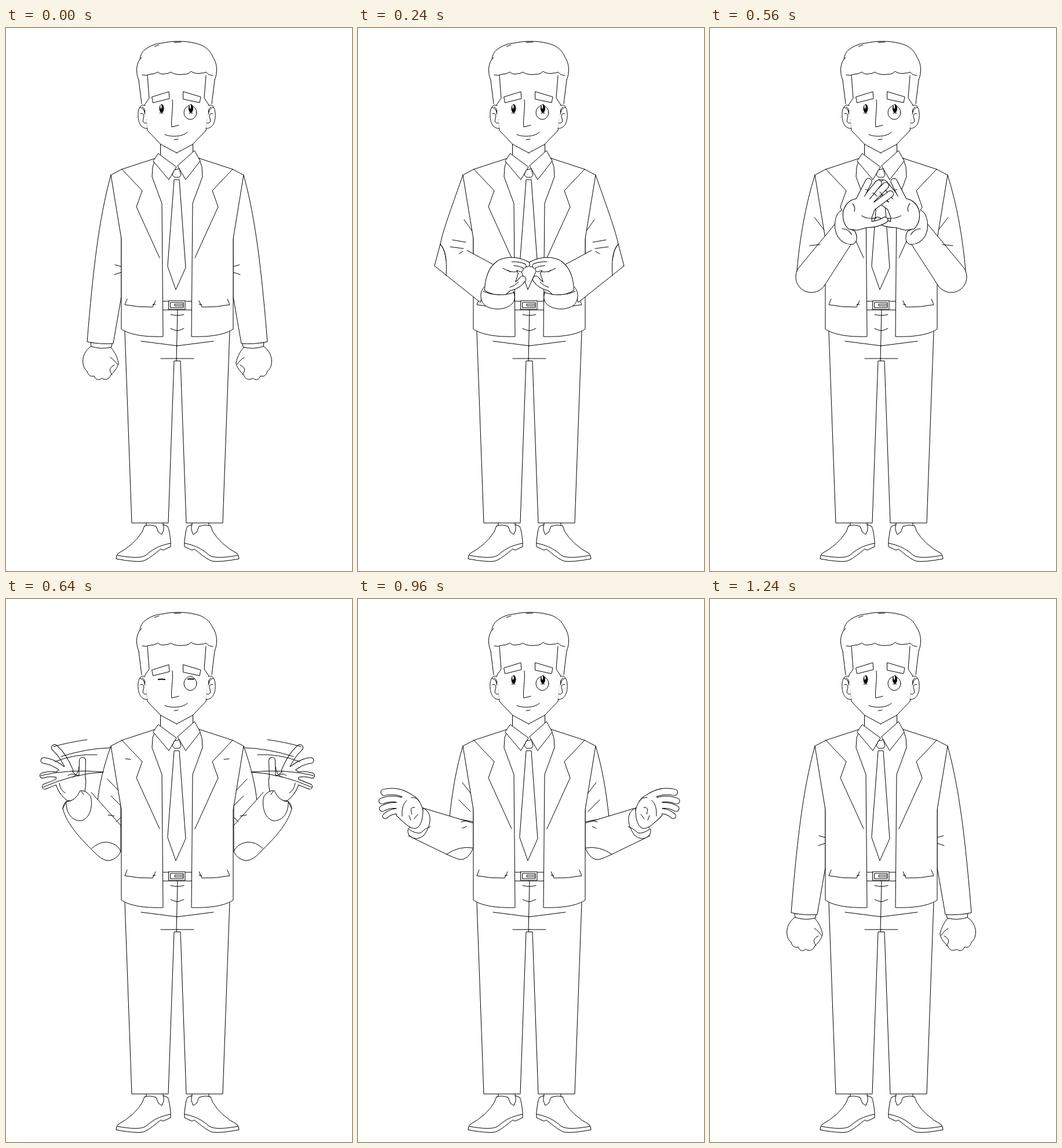
Write an HTML page that moves like this. It is 597 px wide and 938 px high and loops after 2.04 s.

```html
<!DOCTYPE html>
<html lang="en">
<head>
<meta charset="utf-8">
<title>Gesturing man</title>
<style>
  html, body { margin: 0; width: 100%; height: 100%; overflow: hidden; background: #fff; }
  svg { display: block; width: 100vw; height: 100vh; }
  path, ellipse { fill: none; stroke: #000; stroke-width: 1; stroke-linejoin: round; stroke-linecap: round; }
  .w { fill: #fff; }
  .b { fill: #000; }
  .blank { fill: #fff; stroke: none; }
</style>
</head>
<body>
<svg viewBox="0 0 597 938">
  <defs>
    <g id="leg">
      <path d="M205 524L217 855H280L290 575H295.5"/>
      <path d="M233 541L295.5 549M267 571H295.5M284 495Q290 496.500 295.500 496.500M284 519Q290 522 295.500 523"/>
    </g>
    <g id="shoe">
      <path d="M242 855V859M271 855V859"/>
      <path d="M239 860L235 870Q222 892 193 908Q190 911 190 917Q222 923 236 921Q244 919 262 904L267 900L271 902L284 896V887Q282 866 279 861L272 858"/>
      <path d="M192 911Q230 918 241 911C252 902 260 895 284 890"/>
      <path d="M239 860Q248 857 259 861L263 871L269 875L272 867V858"/>
    </g>
    <g id="coat">
      <path d="M258 225L200 244L181 254L199 364V520C212 529 235 534 271 533L269 303L252 257L253 240L258 225"/>
      <path d="M200 244L235 281L225 309L265 397"/>
      <path d="M209 468L205 478Q230 483 253 482L258 471M253 478L258 477"/>
      <path d="M271 472H281M271 487H295.500"/>
    </g>
    <g id="side">
      <path d="M229 90L234 131M244 82L247 121L239 133L244 177L267 201L295 216"/>
      <path class="w" d="M240 134C231 130 227 141 228 154C229 167 236 175 244 173"/>
      <path d="M231 137Q238 138 239 146M235 136Q242 141 239 149M232 148Q237 146 238 152L236 161Q239 166 243 164"/>
      <path d="M266.500 201V219"/>
    </g>
  </defs>

  <use href="#leg"/><use href="#leg" transform="matrix(-1 0 0 1 591 0)"/>
  <use href="#shoe"/><use href="#shoe" transform="matrix(-1 0 0 1 592 0)"/>
  <path d="M296 487L294 575"/>
  <g id="back"></g>
  <path class="blank" d="M258 225L181 254L199 364V520C212 529 235 534 271 533V487H320V533C356 534 379 529 392 520V364L410 254L334 225Z"/>
  <use href="#coat"/><use href="#coat" transform="matrix(-1 0 0 1 591 0)"/>
  <path d="M281 471H309V486H281ZM284 474H306V483H284ZM306 477H291V480H306"/>
  <path class="w" d="M290.500 262H299L310 414L293 452L279 412Z"/>

  <use href="#side"/><use href="#side" transform="matrix(-1 0 0 1 589 0)"/>
  <path class="w" d="M263 217L294 240L281 262L254 230Z"/>
  <path class="w" d="M325 212L296 238L310 262L335 230Z"/>
  <path class="w" d="M291 245L299 243L302 254L299 258H291L287 254Z"/>
  <path d="M229 90C224 78 224 64 231 54C232 46 236 40 239 38C249 30 261 26 270 26C285 22 310 22 325 26C342 29 352 38 357 50C364 60 366 76 360 90"/>
  <path d="M235 81Q242 83 248 80Q257 80 262 76Q267 81 275 79Q281 79 284 76Q293 82 307 80Q315 80 319 75Q327 80 337 78Q342 78 345 76Q350 82 357 82"/>
  <path d="M231 54L234 51M256 32L264 29M290 25L302 24"/>
  <path id="brows" d="M252 119L281 110L282 122L254 129ZM306 110L336 119L334 129L306 123Z"/>
  <path d="M287 124C289 140 284 158 286 171L298 168M274 184C285 189 305 188 313 180M290 193L297 192"/>
  <ellipse cx="318" cy="146" rx="11" ry="12"/>
  <g id="open">
    <ellipse class="b" cx="268.500" cy="139" rx="3.500" ry="7"/><ellipse class="b" cx="319" cy="139" rx="3.500" ry="7"/>
    <ellipse class="blank" cx="267.500" cy="136" rx="1.200" ry="3.500"/><ellipse class="blank" cx="318" cy="136" rx="1.200" ry="3.500"/>
    <path d="M265 147H271M316 147H322"/>
  </g>
  <path id="shut" style="stroke-width:2" d="M263 139Q269 138 274 139M314 138.500Q319 137.500 324 138.500"/>
  <g id="front"></g>
</svg>

<script>
const line = (...ds) => ds.map(d => `<path d="${d}"/>`).join('');
const fill = (...ds) => ds.map(d => `<path class="w" d="${d}"/>`).join('');
const tube = ([d, w]) =>
  `<path d="${d}" style="stroke-width:${w + 1}"/><path d="${d}" style="stroke:#fff;stroke-width:${w - 1}"/>`;

// Fingers sit between the outline of the palm and its fill, so their roots stay hidden.
const hand = (palm, fingers, ...creases) =>
  `<path class="w" style="stroke-width:2" d="${palm}"/>` + fingers.map(tube).join('') +
  `<path class="blank" d="${palm}"/>` + line(...creases);

const hands = {
  fist: { at: [164, 550], dir: 90, art:
    fill('M148 549C136 556 131 570 133 580Q134 588 140 593C142 600 146 603 152 601C154 607 160 610 165 605C172 609 178 607 181 599C190 591 194 583 194 578C192 568 186 557 181 552Z') +
    line('M180 569Q187 573 192 581M187 582Q177 587 180 594L183 599') +
    fill('M146 544L147 550Q165 556 182 551L183 545Z') },
  meet: { at: [240, 458], dir: -53, art:
    fill('M218 447C207 458 212 478 224 482C240 489 262 485 269 472Q272 464 268 455') +
    line('M216 455Q240 466 270 457') +
    hand('M219 453C220 425 230 408 246 400L262 399L276 424L268 448L255 460Q232 462 219 453Z',
      [['M250 403Q271 397 292 408', 9], ['M252 410Q272 405 286 411', 8], ['M254 417Q270 412 281 417', 8], ['M260 449Q277 445 284 434', 11]],
      'M250 415Q263 423 274 421M258 418L263 422M262 448Q270 446 277 439') },
  cross: { at: [281, 352], dir: -50, art:
    fill('M276 318C262 324 258 348 266 364Q276 380 292 378Q302 372 296 356L285 350') +
    line('M274 350Q286 352 290 362') +
    hand('M285 351C272 335 276 310 295 302L318 297L336 312L326 334L325 349L300 354Z',
      [['M318 324L361 296', 11], ['M314 316L354 281', 11], ['M310 310L342 276', 11], ['M300 314L325 272', 11], ['M305 344Q330 350 349 340', 10]],
      'M295 308Q300 315 297 322M309 330Q318 337 334 336M331 292L338 298M343 291L348 297M319 285L323 287') },
  swing: { at: [118, 342], dir: -120, art:
    hand('M106 348C96 340 90 332 86 318L88 298L104 288L120 304L137 310C138 325 135 340 128 347Z',
      [['M92 314Q80 319 67 324', 9], ['M92 305Q78 300 63 305', 9], ['M98 294Q80 280 65 279', 10], ['M110 296Q99 270 84 257', 11], ['M131 318L132 279', 11]],
      'M92 318Q94 331 102 335M126 290Q124 305 115 308M119 304Q112 300 107 305') },
  wide: { at: [118, 342], dir: -125, art:
    hand('M104 350C96 345 92 332 82 319L80 302L92 288L110 296L129 310C131 322 128 332 126 336Q116 352 104 350Z',
      [['M91 320Q80 328 69 334', 9], ['M84 310Q70 317 62 328', 9], ['M88 300Q70 290 52 289', 11], ['M102 292Q88 272 66 264', 11], ['M121 311Q123 292 120 277', 12]],
      'M85 318Q83 330 92 338M114 284Q117 302 106 305M101 297Q96 302 94 309M99 318L97 325') },
  low: { at: [102, 385], dir: -150, art:
    hand('M97 398C85 392 75 382 67 374L66 352L82 336C100 337 110 352 113 372L110 390Z',
      [['M94 346Q72 328 45 334', 11], ['M84 351Q60 341 41 349', 10], ['M80 360Q60 352 42 362', 10], ['M80 369Q62 362 47 375', 9]],
      'M76 375Q75 355 84 348M92 343Q102 342 106 350M98 360Q88 358 93 372M103 372L97 380M88 374L91 382') +
    fill('M112 361C128 368 128 388 114 408Q100 420 88 408Q83 398 90 394C105 403 113 385 112 361Z') +
    line('M88 398Q100 406 108 404Q116 396 125 393') }
};

const place = (name, [x, y], angle) => {
  const { at, dir, art } = hands[name];
  return `<g transform="translate(${x} ${y}) rotate(${angle - dir}) translate(${-at[0]} ${-at[1]})">${art}</g>`;
};

// A sleeve from shoulder over elbow e to wrist w.
function sleeve(e, w, name, bent) {
  const dx = w[0] - e[0], dy = w[1] - e[1], len = Math.hypot(dx, dy);
  const off = (p, r) => [p[0] - dy / len * r, p[1] + dx / len * r];
  const [a, b, c, d] = [off(e, 27), off(w, 21), off(w, -21), off(e, -27)];
  const held = place(name, w, Math.atan2(dy, dx) * 180 / Math.PI);
  if (!bent) return { back: held + fill(`M181 254Q${a} ${b}L${c}Q${d} 199 440V300Z`) };
  return {
    back: fill(`M181 254Q${e[0] - 18} 330 ${e[0] - 26} ${e[1]}L199 ${e[1]}V300Z`),
    front: fill(`M${a}L${b}L${c}L${d}A27 27 0 0 0 ${a}`) + held +
      line('M180 327L197 349M172 376L190 374')
  };
}

const down = { back:
  hands.fist.art +
  fill('M181 254C160 330 150 420 140 542Q165 547 185 545L199 464V300Z') +
  line('M188 409L199 412M187 426L199 422') };

const together = {
  back: fill('M181 254C165 300 148 345 142 373L132 411L199 420V300Z') +
    line('M142 373Q155 387 152 428M183 331L198 352M163 366L186 370M159 378L182 381M174 390L181 386'),
  front: fill('M188 384L236 410L218 450L211 474L132 411') + line('M142 374Q155 387 152 427') + hands.meet.art
};

const crossed = {
  back: fill('M181 254C165 290 158 340 155 405L199 400V300Z') + line('M179 327L197 350M170 374L189 375'),
  front: fill('M161 398Q170 386 188 377L190 390L263 345L298 378L200 447Q190 452 178 452Q152 452 155 405') +
    line('M157 423Q170 413 187 419Q203 430 200 447') + hands.cross.art
};

const raised = art => ({ back:
  fill('M181 254C168 290 160 325 158 351L198 395V300Z') +
  line('M175 311L198 335M181 340L198 357') +
  fill('M147 334L198 391V436Q192 450 177 452Q165 452 150 435C130 415 105 390 98 362L104 350') +
  line('M148 431Q160 419 175 420Q193 423 198 436M176 373L187 375M190 385L198 377') + art +
  fill('M104 350C103 371 115 384 130 383C146 379 150 355 146 341Q138 330 128 331Q120 350 104 350') +
  line('M98 362Q99 353 104 350M130 332L134 338') });

const spread = { back:
  fill('M181 254C170 290 163 330 158 377L199 385V300Z') +
  line('M180 317L197 339M174 347L194 367') +
  fill('M112 361L188 384L199 387V430Q190 452 175 450Q165 447 153 441L87 409') +
  line('M153 441Q174 426 198 430M178 385L188 383M180 396L187 393') + hands.low.art };

const swung = raised(hands.swing.art);
swung.front = line('M82 255Q110 247 140 243M95 272Q140 258 180 257M84 281Q120 267 157 269M60 305Q110 293 168 299M64 325Q115 302 168 299M206 276L215 277');

const poses = [
  [0, down],
  [80, sleeve([158, 405], [170, 525], 'fist')],
  [160, sleeve([158, 412], [222, 472], 'meet', true)],
  [240, together],
  [320, sleeve([166, 424], [262, 378], 'meet', true)],
  [400, crossed],
  [560, sleeve([175, 430], [235, 348], 'cross', true)],
  [600, sleeve([180, 432], [165, 335], 'wide', true)],
  [640, swung],
  [680, raised(place('wide', [119, 341], -118))],
  [720, raised(place('wide', [118, 342], -122))],
  [760, raised(hands.wide.art)],
  [960, spread],
  [1040, sleeve([150, 425], [76, 425], 'low')],
  [1120, sleeve([140, 400], [95, 500], 'fist')],
  [1200, sleeve([150, 405], [132, 532], 'fist')],
  [1240, down]
];

const LOOP = 2040;
const el = id => document.getElementById(id);
const both = (art = '') => `<g transform="matrix(-1 0 0 1 591 0)">${art}</g>${art}`;
const began = performance.now();
let shown;

function draw(now) {
  const t = Math.max(0, now - began) % LOOP;
  const next = poses.findLast(([start]) => t >= start);
  if (next !== shown) {
    shown = next;
    const [start, pose] = next;
    el('back').innerHTML = both(pose.back);
    el('front').innerHTML = both(pose.front);
    const blink = start >= 600 && start < 720;
    el('open').style.display = blink ? 'none' : '';
    el('shut').style.display = blink ? '' : 'none';
    el('brows').setAttribute('transform', `translate(0 ${blink ? 3.5 : 0})`);
  }
  requestAnimationFrame(draw);
}
draw(began);
</script>
</body>
</html>
```
